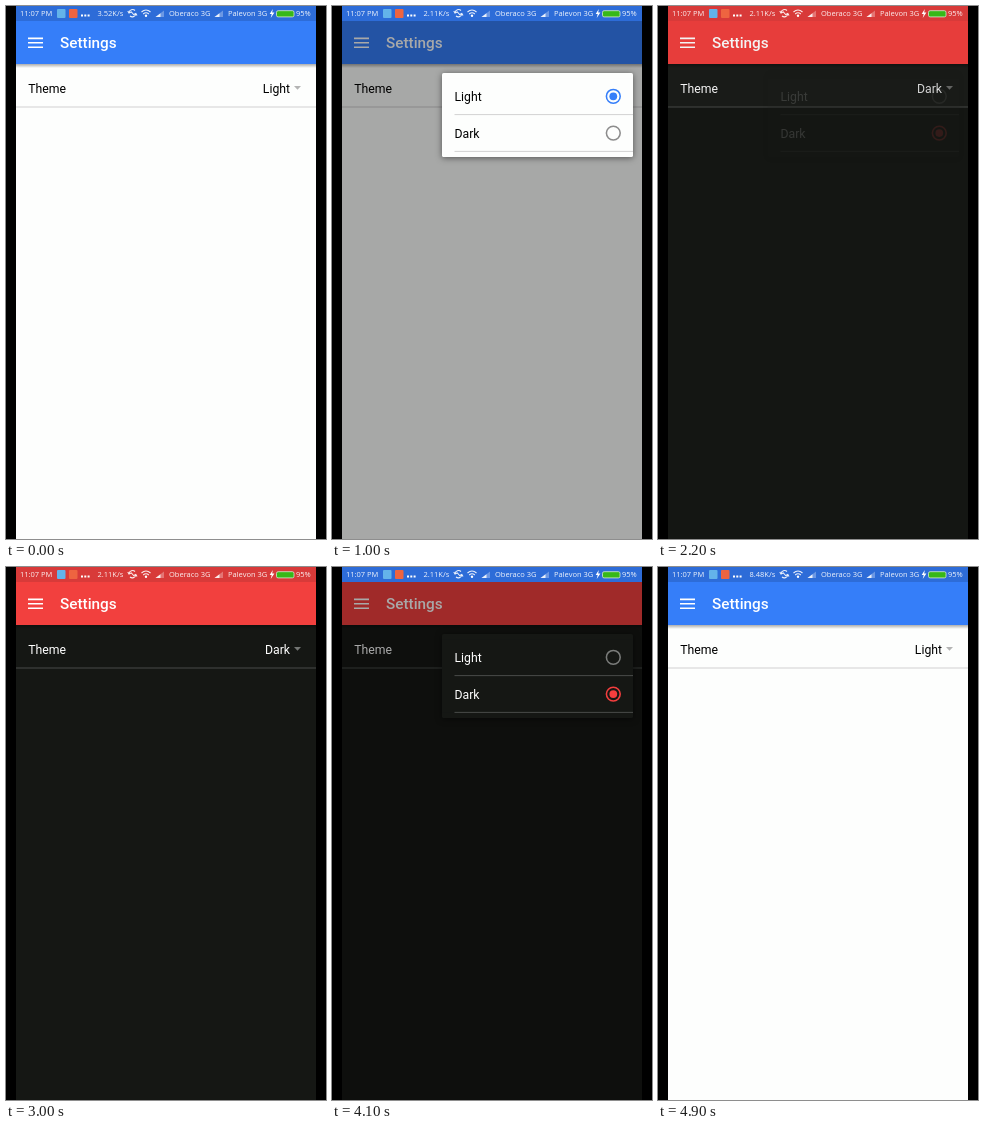
An HTML page that plays this animation: 320x533 px, repeating every 5 s.

```html
<!DOCTYPE html>
<html lang="en">
<head>
<meta charset="utf-8">
<title>Theme settings</title>
<style>
  html, body { margin: 0; width: 100%; height: 100%; overflow: hidden; background: #000; }
  svg { display: block; width: 100vw; height: 100vh; }
  text { font: 12.24px Roboto, sans-serif; }
  .title { font-size: 15.3px; font-weight: 500; }
  .status text { font: 7.5px "Open Sans", "Noto Sans", sans-serif; fill: #fff; fill-opacity: .92; }
  .card { filter: drop-shadow(0 1.5px 3px rgba(0, 0, 0, .5)); }
</style>
</head>
<body>
<svg viewBox="0 0 320 533">
  <defs>
    <linearGradient id="shade" x2="0" y2="1">
      <stop stop-color="#000" stop-opacity=".32"/>
      <stop offset="1" stop-color="#000" stop-opacity="0"/>
    </linearGradient>
    <g id="bars">
      <path d="M0 8.5L8.5 2V8.5Z" fill="#fff" fill-opacity=".3"/>
      <path d="M0 8.5L5 4.7V8.5Z" fill="#fff" fill-opacity=".85"/>
    </g>
  </defs>
  <rect width="320" height="533"/>
  <rect id="page" x="10" width="300" height="533"/>

  <rect id="row" x="10" y="58" width="300" height="43"/>
  <rect id="rowLine" x="10" y="100.5" width="300" height="1"/>
  <g id="rowText">
    <text x="22.3" y="87">Theme</text>
    <text id="choice" x="284" y="86.5" text-anchor="end"></text>
  </g>
  <path id="arrow" d="M288 80h7l-3.5 3.8z"/>

  <rect id="header" x="10" y="15" width="300" height="43"/>
  <rect x="10" y="58" width="300" height="4" fill="url(#shade)"/>
  <path d="M22 32.4h15M22 36.8h15M22 41.2h15" stroke="#fff" stroke-width="1.6"/>
  <text class="title" x="54" y="42" fill="#fff">Settings</text>

  <rect id="dim" x="10" y="15" width="300" height="518"/>

  <g id="popup">
    <rect id="card" class="card" x="110" y="67" width="191" height="84" rx="1.6"/>
    <rect id="options" x="110" y="72.5" width="191" height="73"/>
    <path id="lines" d="M122.5 108.6H301M122.5 145.4H301" stroke-width="1"/>
    <g id="popupText">
      <text x="122.5" y="95">Light</text>
      <text x="122.5" y="131.5">Dark</text>
    </g>
    <g id="lightRadio" transform="translate(281.3 90.3)">
      <circle r="6.9" fill="none" stroke-width="1.55"/><circle r="3.9"/>
    </g>
    <g id="darkRadio" transform="translate(281.3 127.1)">
      <circle r="6.9" fill="none" stroke-width="1.55"/><circle r="3.9"/>
    </g>
  </g>

  <g class="status">
    <rect id="status" x="10" width="300" height="15"/>
    <text x="14" y="10">11:07 PM</text>
    <rect x="51" y="3" width="8.5" height="9" rx="1" fill="#63b3ea"/>
    <rect x="63" y="3" width="8.5" height="9" rx="1" fill="#ee6440"/>
    <path d="M75 9.5h2M78.3 9.5h2M81.6 9.5h2" stroke="#fff" stroke-width="1.8"/>
    <text id="speed" x="91.5" y="10"></text>
    <g fill="none" stroke="#fff" stroke-width="1.1" stroke-opacity=".9">
      <path d="M123 6.5A3.6 3.6 0 0 1 129 4.5M129.8 8A3.6 3.6 0 0 1 124 10M121.8 5l1.2 2 2-1M131 9.5l-1.2-2-2 1M125 5.5l3 3.5"/>
      <path d="M135.5 6Q140 2 144.5 6M137.2 8Q140 5.6 142.8 8"/>
    </g>
    <circle cx="140" cy="9.8" r="1.2" fill="#fff"/>
    <use href="#bars" x="149.5" y="2.5"/>
    <text x="163" y="10">Oberaco 3G</text>
    <use href="#bars" x="208.5" y="2.5"/>
    <text x="222" y="10">Palevon 3G</text>
    <path d="M266.8 3L263.7 8h2l-1 4 3.7-5.4h-2.2z" fill="#fff"/>
    <rect x="270.5" y="4.7" width="17.5" height="6.2" rx="1.6" fill="#37b818" stroke="#d6e8d2" stroke-width=".8"/>
    <text x="290" y="10">95%</text>
  </g>
</svg>
<script>
const LOOP = 5000;
const DIM = 0.34;
const $ = id => document.getElementById(id);

const themes = {
  light: { name: 'Light', page: [253, 254, 253], text: '#000', line: '#d2d2d2', arrow: '#b4b4b4',
           bar: '#357ef9', accent: [53, 126, 249], ring: [140, 140, 140] },
  dark: { name: 'Dark', page: [21, 23, 20], text: '#fff', line: '#484a48', arrow: '#747674',
          bar: '#f2403e', accent: [244, 62, 62], ring: [122, 124, 122] }
};

// Moments in ms
const toDark = 1960, toLight = 4160;
const visits = [{ open: 400, close: 2020 }, { open: 3350, close: 4220 }];

const clamp = x => Math.min(1, Math.max(0, x));
const rgb = c => `rgb(${c.map(Math.round)})`;
const mix = (a, b, k) => a.map((v, i) => v + (b[i] - v) * k);
const set = (id, attrs) => {
  for (const key in attrs) $(id).setAttribute(key, attrs[key]);
};

function bezier(x1, y1, x2, y2) {
  const at = (a, b, s) => 3 * a * s * (1 - s) ** 2 + 3 * b * s * s * (1 - s) + s ** 3;
  return x => {
    x = clamp(x);
    if (x === 0 || x === 1) return x;
    let lo = 0, hi = 1;
    for (let i = 0; i < 20; i++) {
      const mid = (lo + hi) / 2;
      if (at(x1, x2, mid) < x) lo = mid; else hi = mid;
    }
    return at(y1, y2, lo);
  };
}
const ease = bezier(.25, .1, .25, 1);
const glide = bezier(.36, .66, .04, 1);
const snap = bezier(.4, 0, .2, 1);

// Goes from 0 to 1 after the dark switch and back after the light one
const darkness = (t, curve, ms) =>
  curve((t - toDark) / ms) - curve((t - toLight) / ms);

function drawRadio(id, on, theme) {
  const [ring, dot] = $(id).children;
  ring.setAttribute('stroke', rgb(mix(theme.ring, theme.accent, on)));
  dot.setAttribute('fill', rgb(theme.accent));
  dot.setAttribute('transform', `scale(${on})`);
}

function drawPopup(t) {
  const visit = visits.find(v => t >= v.open && t < v.close + 500);
  if (!visit) {
    set('popup', { opacity: 0 });
    set('dim', { opacity: 0 });
    return;
  }
  const grow = glide((t - visit.open) / 500);
  const left = 1 - glide((t - visit.close) / 500);
  set('popup', {
    opacity: grow * left,
    transform: `translate(301 67) scale(${grow}) translate(-301 -67)`
  });
  set('dim', { opacity: DIM * ease((t - visit.open - 200) / 350) * left });
}

function draw(t) {
  const isDark = t >= toDark && t < toLight;
  const theme = isDark ? themes.dark : themes.light;
  const item = rgb(mix(themes.light.page, themes.dark.page, darkness(t, ease, 300)));
  const picked = darkness(t, snap, 280);

  for (const id of ['page', 'card']) set(id, { fill: rgb(theme.page) });
  for (const id of ['row', 'options']) set(id, { fill: item });
  for (const id of ['rowText', 'popupText']) set(id, { fill: theme.text });
  set('header', { fill: theme.bar });
  set('rowLine', { fill: theme.line });
  set('lines', { stroke: theme.line });
  set('arrow', { fill: theme.arrow });
  set('status', { fill: t >= 1850 && t < 4050 ? '#d83a39' : '#2d6cd8' });
  $('choice').textContent = theme.name;
  $('speed').textContent = t < 400 ? '3.52K/s' : t < 4600 ? '2.11K/s' : '8.48K/s';

  drawRadio('lightRadio', 1 - picked, theme);
  drawRadio('darkRadio', picked, theme);
  drawPopup(t);
}

const start = performance.now();
function tick() {
  draw((performance.now() - start) % LOOP);
  requestAnimationFrame(tick);
}
tick();
</script>
</body>
</html>
```
